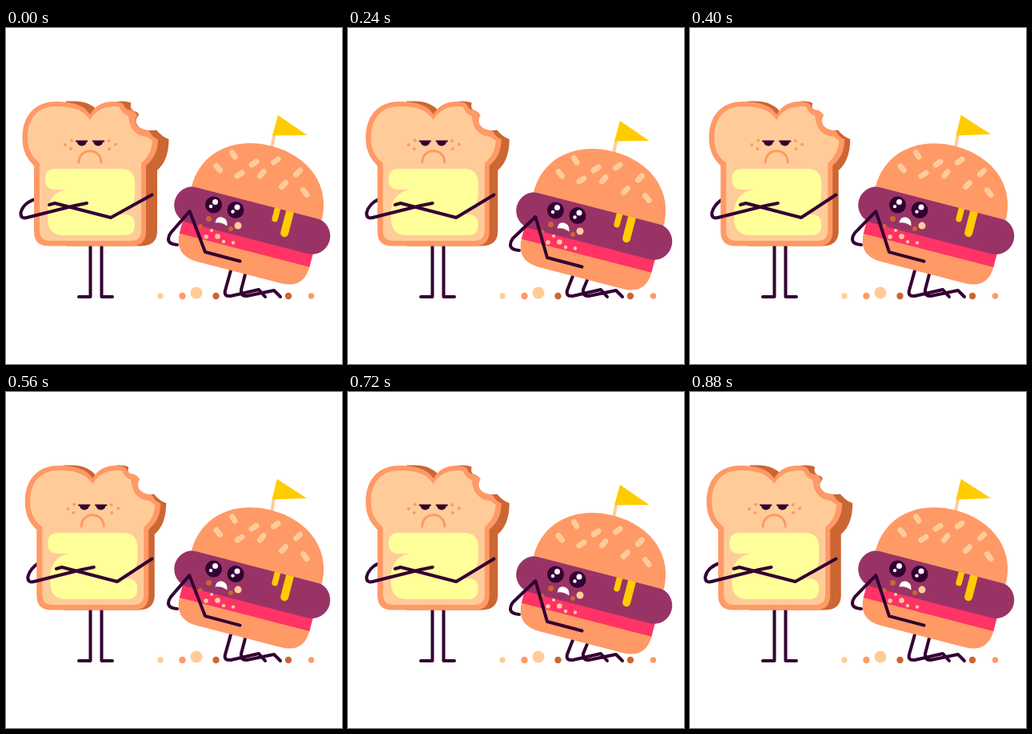
Recreate the animation shown at these times as an HTML page. Size 420 by 420 pixels, loop 0.96 s.

```html
<!DOCTYPE html>
<html>
<head>
<meta charset="utf-8">
<style>
  html, body { margin: 0; height: 100%; overflow: hidden; background: #fff; }
  svg { display: block; width: 100%; height: 100%; }
  .line { fill: none; stroke: #303; stroke-width: 4; stroke-linecap: round; stroke-linejoin: round; }
  .dark { fill: #303; }
  .brown { fill: #c63; }
  .orange { fill: #f96; }
  .peach { fill: #fc9; }
  .butter { fill: #ff9; }
  .mustard { fill: #fc0; }
  .white { fill: #fff; }
  .drip { fill: none; stroke: #fc0; stroke-linecap: round; }
  .seeds { fill: none; stroke: #fc9; stroke-width: 7; stroke-linecap: round; }
</style>
</head>
<body>
<svg viewBox="0 0 420 420">
  <!-- crumbs on the floor -->
  <circle class="peach" cx="193" cy="335" r="3.7"/>
  <circle class="orange" cx="220.5" cy="335" r="4.2"/>
  <circle class="peach" cx="238" cy="331" r="7.5"/>
  <circle class="brown" cx="262.5" cy="335" r="4.2"/>
  <circle class="brown" cx="353" cy="335" r="4.2"/>
  <circle class="orange" cx="381.5" cy="335" r="3.7"/>

  <!-- toast -->
  <path class="line" d="M105.500 268V336H91M119.500 268V336H133"/>
  <path id="elbow" class="line"/>
  <path id="back" class="brown" d="M118 108C112 97 100 91.500 85 91.500H75V272.500H169Q189 272 189 254V178C198 170 203.500 158 203.500 139Q195 136 188 127.500Q184 128 180 128Q168 128 164 121Q160 115 166 109Q166 105 160 104Q154 100 156.500 94Q154 91.500 144 91.500C131 92 124 97 118 108Z"/>
  <g id="front">
    <path class="orange" d="M105 108C98 97 85 92 62 92C35 92 20.500 111 20.500 137C20.500 156 28 165 35 172V254Q35 272.500 53 272.500H157Q175 272.500 175 254V172C183 165 190 156 190 139Q183 137 179 128.500Q168 128 163 121Q160 115 164 109Q160 103 155 102.500Q150 102 148 98Q147 92 134 92C120 92 112 97 105 108Z"/>
    <path class="peach" d="M105 115C97 103 85 98 62 98C39 98 27 114 27 137C27 155 35 163 42 169V253Q42 266 55 266H156Q169 266 169 253V169C176 163 182 155 183 141L176 136Q163 135 157 125Q153 116 153 110Q145 107 142 99L138 98C120 98 112 104 105 115Z"/>
    <path class="butter" d="M62 176H143Q161 176 161 194V206C161 222 153 231 140 233H148Q161 233 161 246Q161 259 148 259H72Q52 259 52 238V232C52 214 62 204 76 202H62Q49 202 49 189Q49 176 62 176Z"/>
    <path class="dark" d="M87 140.500H102V142.500H100.500A5.700 5 0 0 1 89 142.500H87ZM108 140.500H123V142.500H121A5.700 5 0 0 1 109.500 142.500H108Z"/>
    <path d="M91 168C91 149 119 149 119 168" fill="none" stroke="#f96" stroke-width="3" stroke-linecap="round"/>
    <g id="freckles" class="orange"></g>
  </g>
  <path id="toastArms" class="line"/>

  <!-- burger -->
  <path id="burgerLegs" class="line"/>
  <g id="burger">
    <g id="flag">
      <path d="M331.500 152L336 131" stroke="#fc9" stroke-width="4"/>
      <path class="mustard" d="M340 109L376.500 134L333 134.500Z"/>
    </g>
    <g transform="translate(307.500 241.500) rotate(14.500)">
      <path class="orange" d="M-84 36H84Q84 66 54 66H-54Q-84 66 -84 36Z"/>
      <path fill="#f36" d="M-84 20H84V37.500H-84Z"/>
      <rect x="-100" y="-24" width="200" height="46" rx="23" fill="#936"/>
      <path class="drip" stroke-width="7.500" d="M27 -24V-10"/>
      <path class="drip" stroke-width="10" d="M43 -24V4"/>
      <path class="orange" d="M-84 -23.500C-84 -66 -50 -97 0 -97S84 -66 84 -23.500Z"/>
    </g>
    <path class="seeds" d="M282.500 155.500L286 161M307 171L313 167M334.500 168L340 164M362.500 183L367.500 178M263 172.500L267.500 178M289 185L295 181M317.500 185L322 179.500M344.500 198.500L349.500 193.500M371.500 202.500L376 208.500"/>
    <g class="dark"><circle cx="259.500" cy="221" r="10.500"/><circle cx="287" cy="227.500" r="10.500"/></g>
    <g class="white">
      <circle cx="261.500" cy="217.500" r="3.500"/><circle cx="256" cy="223" r="2.200"/>
      <circle cx="289" cy="224" r="3.500"/><circle cx="283.500" cy="229.500" r="2.200"/>
      <path d="M261.500 243.500Q263 235 270 236.500Q277.500 238.500 276.500 247.500Q269 242 261.500 243.500Z"/>
    </g>
    <g id="browned" class="brown"></g>
    <g id="crumbs" class="peach"></g>
    <path id="burgerArms" class="line"/>
  </g>
</svg>
<script>
const LOOP = 960, STEP = 80;
const el = id => document.getElementById(id);

const dots = (id, list) => {
  el(id).innerHTML = list.map(([x, y, r]) => `<circle cx="${x}" cy="${y}" r="${r}"/>`).join('');
};
dots('freckles', [[74, 146, 2], [82, 140.5, 2], [81, 151, 2], [128.5, 141, 2], [137, 145.5, 2], [129, 151, 2]]);
dots('browned', [[253.5, 238.5, 3.5], [281, 251, 3], [243, 247.5, 2.5]]);
dots('crumbs', [[290, 247, 4.5], [250, 261, 2.8], [264.5, 260.5, 3.3], [257, 253, 2], [272, 267, 2.2], [284, 268.5, 2.2]]);

function draw(t) {
  // The toast turns once per loop, the burger pleads twice.
  const turn = (1 - Math.cos(2 * Math.PI * t / LOOP)) / 2;
  const beat = 4 * Math.PI * t / LOOP;
  const dip = 7 * Math.sin(beat / 2) ** 6;
  const handX = 232 - 3 * Math.cos(beat - 0.65);

  el('front').setAttribute('transform', `translate(${3.5 * turn})`);
  el('back').setAttribute('transform', `translate(${-3.5 * turn})`);
  const a = 9.5 * turn;
  el('elbow').setAttribute('d',
    `M${37 + 4 * turn} 214C${26 + a} 217 ${20 + a} 224 ${18.5 + a} 231Q${18 + a} 239 ${26 + a} 237`);
  el('toastArms').setAttribute('d',
    `M${26 + a} 237L${86 + a} 222L${101 + a} 219` +
    `M${54 + a} 221L${61 + a} 219L${131 + a * 0.9} 237L182.500 208.500`);

  el('burger').setAttribute('transform', `translate(0 ${dip})`);
  el('flag').setAttribute('transform', `rotate(${-2.5 * Math.sin(beat) ** 2} 331.500 150)`);
  el('burgerArms').setAttribute('d',
    `M214 271Q203 270 203 264Q203 260 206 256L${handX} 229L249 280L292.500 291.500`);
  el('burgerLegs').setAttribute('d',
    `M281 ${303 + dip}L274 328Q272 336 281 335L316 327L324 336` +
    `M299 ${308 + dip}L294 327Q293 336 301 335L335 328L343 336`);
}

function frame() {
  const t = performance.now() % LOOP;
  draw(Math.floor(t / STEP) * STEP);
  requestAnimationFrame(frame);
}
frame();
</script>
</body>
</html>
```
